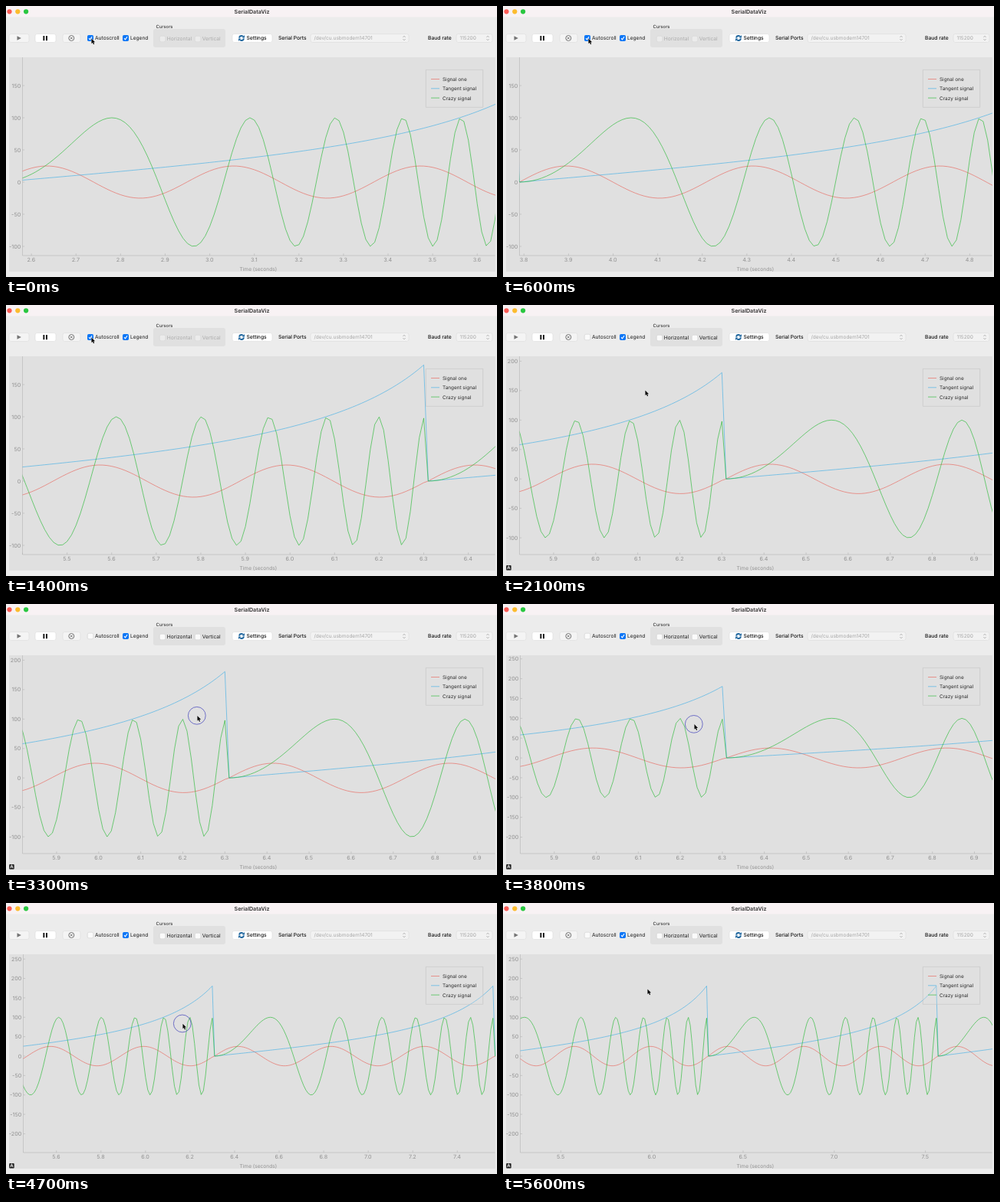
Write an HTML page with a canvas that moves like this. It is 640 px wide and 354 px high and loops after 5800 ms.

```html
<!DOCTYPE html>
<html lang="en">
<head>
<meta charset="utf-8">
<title>SerialDataViz</title>
<style>
  html, body { margin: 0; width: 100%; height: 100%; overflow: hidden; background: #ececec; }
  canvas { display: block; }
</style>
</head>
<body>
<canvas id="stage" width="640" height="354"></canvas>
<script>
const g = document.getElementById('stage').getContext('2d');
g.textRendering = 'geometricPrecision';
const LOOP = 5800, FRAME = 100;
const UNCHECK = 1700, PRESS = 3100, RELEASE = 5200;
const TOP = 67, BOTTOM = 326, RIGHT = 637.5;
const GRAB = { x: 249, y: 146.5 };

// Pointer path: time, x, y
const PATH = [
  [0, 111, 43], [1700, 111, 43], [1800, 132, 75], [2400, 238, 149],
  [2800, 247, 147.5], [3100, 249, 146.5], [3400, 249, 146.5],
  [3800, 249, 157.6], [4200, 249, 158.15], [4700, 230, 158.15],
  [4900, 224, 158.15], [5300, 224, 158.15], [5600, 188, 113]
];

// Each signal restarts every 126 samples of 10 ms
const SIGNALS = [
  { name: 'Signal one', color: '#e8574d', width: 0.58, f: x => 25 * Math.sin(3 * x) },
  { name: 'Tangent signal', color: '#36abe6', width: 0.6, f: x => 60 * Math.tan(x / 5) },
  { name: 'Crazy signal', color: '#22b82e', width: 0.62, f: x => 100 * Math.sin(x * x) }
];
const phase = n => ((n - 1) % 126) * 0.05;

function pointerAt(t) {
  const i = PATH.findIndex(p => p[0] > t);
  if (i < 0) return { x: 188, y: 113 };
  const [t0, x0, y0] = PATH[i - 1], [t1, x1, y1] = PATH[i];
  const u = (t - t0) / (t1 - t0);
  return { x: x0 + (x1 - x0) * u, y: y0 + (y1 - y0) * u };
}

// Visible range: x0 and kx map seconds, zero and ky map values
function viewAt(t) {
  if (t < UNCHECK) {
    const last = Math.round((3.64 + 2.015 * t / 1000) * 100) / 100;
    return { left: 21.5, x0: last - 1.06, kx: 616 / 1.06, zero: 230, ky: 0.84 };
  }
  const drag = pointerAt(Math.min(Math.max(t, PRESS), RELEASE));
  const fx = Math.exp(0.0334 * (GRAB.x - drag.x));
  const fy = Math.exp(0.0357 * (drag.y - GRAB.y));
  const ky = 0.769 / fy;
  const zero = 147.3 + 79.9 / fy;
  const left = zero + 200 * ky < 322 ? 22.5 : 21.5;
  const span = 1.123 * fx;
  return { left, x0: 6.234 - 0.415 * fx, kx: (RIGHT - left) / span, zero, ky };
}

function text(s, x, y, size, color = '#1c1c1c', align = 'left', weight = 400) {
  g.font = `${weight} ${size}px Inter, "Open Sans", sans-serif`;
  g.fillStyle = color;
  g.textAlign = align;
  g.textBaseline = 'alphabetic';
  g.fillText(s, x, y);
}

function box(x, y, w, h, r, fill, stroke) {
  g.beginPath();
  g.roundRect(x, y, w, h, r);
  g.fillStyle = fill;
  g.fill();
  if (stroke) {
    g.strokeStyle = stroke;
    g.lineWidth = 0.6;
    g.stroke();
  }
}

function line(points, color, width) {
  g.beginPath();
  points.forEach(([x, y]) => g.lineTo(x, y));
  g.strokeStyle = color;
  g.lineWidth = width;
  g.stroke();
}

function disc(x, y, r, fill) {
  g.beginPath();
  g.arc(x, y, r, 0, 7);
  g.fillStyle = fill;
  g.fill();
}

function ring(x, y, r, color, width) {
  g.beginPath();
  g.arc(x, y, r, 0, 7);
  g.strokeStyle = color;
  g.lineWidth = width;
  g.stroke();
}

function poly(points, fill) {
  g.beginPath();
  points.forEach(([x, y]) => g.lineTo(x, y));
  g.closePath();
  g.fillStyle = fill;
  g.fill();
}

function checkbox(x, y, on) {
  if (on) {
    box(x, y, 8, 8, 1.8, '#0b76f6');
    line([[x + 2, y + 4.2], [x + 3.5, y + 5.9], [x + 6.1, y + 2]], '#fff', 1.1);
  } else {
    box(x + 0.2, y + 0.2, 7.6, 7.6, 1.8, '#fafafa', '#d0d0d0');
  }
}

function button(x, w, fill = '#fff') {
  box(x, 36.5, w, 11, 2.6, fill, '#dcdcdc');
}

function combo(x, w, label) {
  button(x, w, '#f2f2f2');
  text(label, x + 4.5, 44.3, 6.5, '#a6a6a6');
  const c = x + w - 6;
  line([[c - 1.6, 40.9], [c, 39.2], [c + 1.6, 40.9]], '#a4a4a4', 0.8);
  line([[c - 1.6, 43.1], [c, 44.8], [c + 1.6, 43.1]], '#a4a4a4', 0.8);
}

function syncIcon(x, y) {
  const blue = '#22689f';
  g.strokeStyle = blue;
  g.lineWidth = 1.9;
  for (const a of [0, Math.PI]) {
    g.save();
    g.translate(x, y);
    g.rotate(a);
    g.beginPath();
    g.arc(0, 0, 3, Math.PI * 1.05, Math.PI * 1.75);
    g.stroke();
    poly([[4, -3.9], [4, -0.5], [0.6, -0.5]], blue);
    g.restore();
  }
}

function drawWindow(t) {
  const free = t >= UNCHECK;
  g.fillStyle = '#ececec';
  g.fillRect(0, 0, 640, 354);
  g.fillStyle = '#f8f2f4';
  g.fillRect(0, 0, 640, 14.5);
  ['#fb5c56', '#fcbc2e', '#29c740'].forEach((c, i) => disc(4.5 + i * 10.8, 7.3, 3.1, c));
  text('SerialDataViz', 320.5, 10, 7.1, '#303030', 'center', 600);

  button(4, 26, '#f4f4f4');
  poly([[14.5, 39.2], [19.8, 42], [14.5, 44.8]], '#737373');
  button(38, 27);
  g.fillStyle = '#111';
  g.fillRect(48.4, 39, 1.9, 6.2);
  g.fillRect(52, 39, 1.9, 6.2);
  button(74, 23, '#f4f4f4');
  ring(85.3, 42, 3.5, '#757575', 1);
  line([[83.9, 40.6], [86.7, 43.4]], '#757575', 1);
  line([[86.7, 40.6], [83.9, 43.4]], '#757575', 1);

  checkbox(106, 38, !free);
  text('Autoscroll', 116, 44.4, 6.7);
  checkbox(152, 38, true);
  text('Legend', 162, 44.4, 6.6);

  text('Cursors', 195.5, 29, 5.9);
  box(192, 30, 94, 24, 3, '#e0e0e0');
  const ink = free ? '#1c1c1c' : '#acacac';
  [[200, 'Horizontal'], [246, 'Vertical']].forEach(([x, s]) => {
    if (free) checkbox(x, 39, false);
    else box(x + 0.2, 39.2, 7.6, 7.6, 1.8, '#ebebeb', '#d6d6d6');
    text(s, x + 9.8, 45.4, 6.7, ink);
  });

  button(295, 52);
  syncIcon(307, 42);
  text('Settings', 313.4, 44.4, 6.7, '#111', 'left', 500);
  text('Serial Ports', 355, 44.4, 6.7, '#111', 'left', 500);
  combo(397, 128, '/dev/cu.usbmodem14701');
  text('Baud rate', 550, 44.4, 6.7, '#111', 'left', 500);
  combo(587, 47, '115200');

  g.fillStyle = '#e0e0e0';
  g.fillRect(4, TOP, 634, 280);
}

function drawAxes(v) {
  const gray = '#b4b4b4', ink = '#929292';
  line([[v.left, TOP], [v.left, BOTTOM], [RIGHT, BOTTOM]], gray, 0.6);

  const step = [0.1, 0.2, 0.5].find(s => s * v.kx >= 50) || 1;
  for (let n = Math.ceil(v.x0 / step); ; n++) {
    const x = v.left + (n * step - v.x0) * v.kx;
    if (x > 632) break;
    line([[x, BOTTOM - 2.7], [x, BOTTOM]], gray, 0.6);
    if (x >= 26) text((n * step).toFixed(1), x - 0.3, 333.5, 7.2, ink, 'center');
  }
  for (let y = -250; y <= 250; y += 50) {
    const py = v.zero - y * v.ky;
    if (py < 70 || py > 322) continue;
    line([[v.left, py], [v.left + 2.7, py]], gray, 0.6);
    text(String(y), v.left - 2.3, py + 2.6, 7.2, ink, 'right');
  }
  text('Time (seconds)', 328.8, 345.5, 6.6, ink, 'center');
}

function drawSignals(v) {
  g.save();
  g.beginPath();
  g.rect(v.left, TOP, RIGHT + 0.5 - v.left, BOTTOM - TOP);
  g.clip();
  g.lineJoin = 'round';
  const first = Math.floor(v.x0 * 100) - 1;
  const last = Math.ceil((v.x0 + (RIGHT - v.left) / v.kx) * 100) + 1;
  for (const s of SIGNALS) {
    const points = [];
    for (let n = first; n <= last; n++) {
      points.push([v.left + (n / 100 - v.x0) * v.kx, v.zero - s.f(phase(n)) * v.ky]);
    }
    line(points, s.color, s.width);
  }
  g.restore();
}

function drawLegend() {
  box(547.3, 83.3, 74.4, 49, 0, 'rgba(222,222,222,.25)', '#c2c2c2');
  SIGNALS.forEach((s, i) => {
    const y = 95.5 + i * 12.3;
    line([[554, y], [565, y]], s.color, s.width);
    text(s.name, 569, y + 2.4, 6.4, '#2a2a2a');
  });
}

function drawPointer(t) {
  const { x, y } = pointerAt(t);
  if (t >= PRESS && t < RELEASE) ring(x - 0.2, y - 0.7, 11.4, '#4a4abc', 0.75);
  g.save();
  g.translate(x + 0.4, y - 0.5);
  g.beginPath();
  [[0, 0], [0, 6.7], [1.5, 5.3], [2.6, 7.8], [3.8, 7.3], [2.7, 4.9], [4.7, 4.8]]
    .forEach(p => g.lineTo(...p));
  g.closePath();
  g.strokeStyle = '#f4f4f4';
  g.lineWidth = 1;
  g.stroke();
  g.fillStyle = '#0a0a0a';
  g.fill();
  g.restore();
}

function drawAutoButton() {
  box(4.2, 340, 6.5, 6.5, 1, '#222');
  text('A', 7.45, 345.4, 6, '#fff', 'center', 600);
}

function render(ms) {
  const t = Math.floor((ms % LOOP) / FRAME) * FRAME;
  const v = viewAt(t);
  drawWindow(t);
  drawAxes(v);
  drawSignals(v);
  drawLegend();
  if (t > UNCHECK) drawAutoButton();
  drawPointer(t);
}

function tick() {
  render(performance.now());
  requestAnimationFrame(tick);
}
tick();
</script>
</body>
</html>
```
